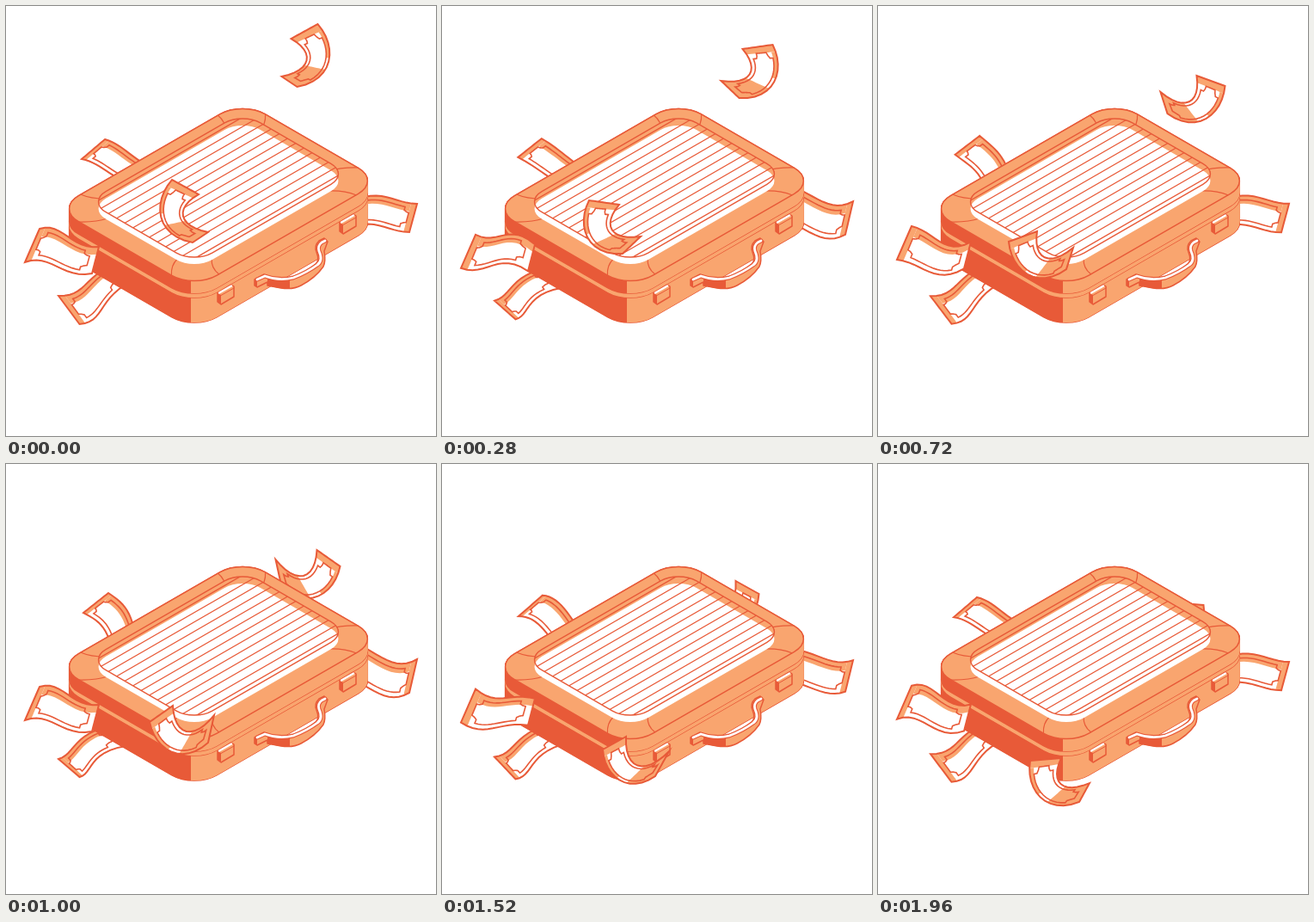
These frames come from a looping animation (500 by 500 pixels, 2 s). An HTML page with a canvas:

```html
<!DOCTYPE html>
<html>
<head>
<meta charset="utf-8">
<style>
html, body { margin: 0; width: 100%; height: 100%; overflow: hidden; background: #fff; }
canvas { display: block; }
</style>
</head>
<body>
<canvas id="stage" width="500" height="500"></canvas>
<script>
const DARK = '#e85a38', LIGHT = '#f9a56f', WHITE = '#fff';
const LOOP = 2000, STEP = 40;
const g = document.getElementById('stage').getContext('2d');
const caseArt = new OffscreenCanvas(500, 500);

const lerp = (a, b, k) => a + (b - a) * k;
const mix = (a, b, k) => [lerp(a[0], b[0], k), lerp(a[1], b[1], k)];
const add = (a, b) => [a[0] + b[0], a[1] + b[1]];

function paint(c, path, fill, stroke, width = 1.5) {
  if (fill) { c.fillStyle = fill; c.fill(path); }
  if (stroke) { c.strokeStyle = stroke; c.lineWidth = width; c.stroke(path); }
}

// ---- Suitcase, in isometric coordinates around the middle of the lid ----
const isoPoint = (u, v, dy = 0) => [247 + .866 * (u + v), 219.5 + dy + .5 * (v - u)];

function isoRect(dy, w, h, r) {
  const flat = new Path2D(), path = new Path2D();
  flat.roundRect(-w / 2, -h / 2, w, h, r);
  path.addPath(flat, new DOMMatrix([.866, -.5, .866, .5, 247, 219.5 + dy]));
  return path;
}

function drawCase(c) {
  c.lineJoin = c.lineCap = 'round';
  const slab = dy => isoRect(dy, 250.2, 185.3, 30);
  const sides = c.createLinearGradient(0, 0, 500, 0);
  [[0, DARK], [.43, DARK], [.43, LIGHT], [1, LIGHT]].forEach(s => sides.addColorStop(...s));
  const extrude = (from, to, fill) => {
    for (let y = from; y > to; y -= .5) paint(c, slab(y), fill);
  };
  for (let y = 48.5; y >= 0; y -= .5) paint(c, slab(y), null, DARK);
  extrude(48.5, 19.5, sides);
  paint(c, slab(19.5), null, DARK);
  extrude(19.5, 14.5, LIGHT);
  paint(c, slab(14.5), null, DARK);
  extrude(14.5, 0, sides);
  paint(c, slab(0), LIGHT, DARK);

  // Seams of the four corner pieces
  const seams = new Path2D();
  for (const i of [-1, 1]) for (const j of [-1, 1]) {
    seams.moveTo(...isoPoint(i * 79, j * 70));
    seams.quadraticCurveTo(...isoPoint(i * 90, j * 80), ...isoPoint(i * 92, j * 92.6));
    seams.moveTo(...isoPoint(i * 102, j * 47));
    seams.quadraticCurveTo(...isoPoint(i * 114, j * 50), ...isoPoint(i * 125, j * 62));
  }
  paint(c, seams, null, DARK, 1.2);

  // Striped panel
  const top = isoRect(-8, 207.5, 142.7, 24), base = isoRect(0, 207.5, 142.7, 24);
  paint(c, top, LIGHT);
  paint(c, base, WHITE);
  c.save();
  c.clip(top);
  const stripes = new Path2D();
  for (let v = -66; v < 71; v += 11) {
    stripes.moveTo(...isoPoint(-104, v, -8));
    stripes.lineTo(...isoPoint(104, v, -8));
  }
  paint(c, stripes, null, DARK, 1.4);
  c.restore();
  paint(c, top, null, DARK, 1.4);

  // Latches
  for (const [x, y] of [[0, 0], [142, -82]]) {
    c.save();
    c.translate(x, y);
    paint(c, new Path2D('M246 334L262 324L265 326V338L250 347L246 344Z'), LIGHT, DARK);
    paint(c, new Path2D('M246 334L250 336V347L246 344Z'), DARK);
    paint(c, new Path2D('M248 333.5L262 325.5'), null, WHITE, 2.4);
    paint(c, new Path2D('M250 336.5L265 328'), null, DARK, 1);
    c.restore();
  }

  // Handle
  paint(c, new Path2D('M289 318L300 312Q316 319 333 315Q348 310 360 300Q365 296 361 286' +
    'Q358 279 364 273L370 270L374 274L370 285Q372 297 369 303Q360 316 343 325' +
    'Q334 330 320 328L304 325V321L292 327L289 325Z'), LIGHT, DARK);
  paint(c, new Path2D('M304 315Q318 320 330 318V329Q318 329 304 325Z'), DARK);
  paint(c, new Path2D('M289 318L292 320V327L289 325Z'), DARK);
  const grip = new Path2D('M292 318L301 314Q317 320 334 316Q350 310 362 301Q369 296 364 285Q362 279 367 275L371 273');
  paint(c, grip, null, DARK, 5);
  paint(c, grip, null, WHITE, 2.8);
}

// ---- Banknotes: a strip between two cubic edges, addressed by (s along, t across) ----
function bezier(p, s) {
  const r = s, q = 1 - s, w = [q * q * q, 3 * q * q * r, 3 * q * r * r, r * r * r];
  return [0, 1].map(k => w.reduce((sum, f, i) => sum + f * p[i][k], 0));
}

function trace(edges, corners) {
  const path = new Path2D();
  corners.forEach((a, i) => {
    const b = corners[(i + 1) % corners.length];
    for (let k = 0; k < 12; k++) {
      const [s, t] = mix(a, b, k / 12);
      path.lineTo(...mix(bezier(edges[0], s), bezier(edges[1], s), t));
    }
  });
  path.closePath();
  return path;
}

const box = (s0, t0, s1, t1) => [[s0, t0], [s1, t0], [s1, t1], [s0, t1]];
const notch = [[.09, .33], [.13, .31], [.17, .26], [.17, .15]];
const flipS = ([s, t]) => [1 - s, t], flipT = ([s, t]) => [s, 1 - t];
const half = [...notch, ...notch.map(flipS).reverse()];
const FRAME = [...half, ...half.map(flipT).reverse()];

function drawNote(edges, shades) {
  const outline = trace(edges, box(0, 0, 1, 1));
  paint(g, outline, WHITE);
  for (const b of shades) paint(g, trace(edges, box(...b)), LIGHT);
  paint(g, trace(edges, FRAME), null, DARK, 1.6);
  paint(g, outline, null, DARK, 2);
}

// Fluttering notes. Each vector: x, y, then cosine y, sine y and cosine x swings.
const flutters = {
  right: { turns: 3, edge: [[478, 228.5, 1.5], [452, 236, -6], [436, 216, -6], [400, 216, 12]],
    ends: [[-9, 36, -3], [-9, 36, -3]] },
  lower: { turns: 3, edge: [[61, 340, -3], [86, 338, 0, 0, 6], [84, 314, 2, 0, 6], [125, 302, -2]],
    ends: [[24.5, 27, 6], [14, 24]] },
  upper: { turns: 1, edge: [[117, 152.5, 2.5, 0, -2], [134, 160, 0, 6], [145, 172, 4, 2], [158, 192, -6, 0, 8]],
    ends: [[-28, 23, 0, -1.5, 1], [-27, 18]] },
  front: { turns: 2, edge: [[39, 260.6, -1.6, 5], [65, 267.3, -17, 9], [77, 273.3, 11, -21], [108, 276.5, 3.5, 1.5]],
    ends: [[-17, 39], [-8, 31]] }
};

function drawFlutter({ turns, edge, ends }, time) {
  const a = time / LOOP * turns * 2 * Math.PI, cos = Math.cos(a), sin = Math.sin(a);
  const swing = ([x, y, cy = 0, sy = 0, cx = 0]) => [x + cx * cos, y + cy * cos + sy * sin];
  const near = edge.map(swing), [e0, e1] = ends.map(swing);
  const far = near.map((p, i) => add(p, mix(e0, e1, i / 3)));
  drawNote([near, far], [[0, 0, .09, 1], [.09, 0, 1, .28]]);
}

// Falling notes: outer and inner corner of the top end, then of the curled end
const times = [0, 280, 720, 1000, 1240, 1520, 1960];
const poses = [
  [193, 202, 224, 219, 217, 275, 235, 263],
  [171, 226, 206, 231, 210, 288, 231, 268],
  [152, 274, 185, 262, 219, 306, 227, 281],
  [167, 300, 194, 281, 235, 324, 242, 292],
  [184, 321, 209, 297, 253, 336, 256, 302],
  [187, 332, 214, 317, 248, 363, 264, 334],
  [177, 345, 213, 342, 234, 393, 246, 371]
];

function poseAt(time) {
  const last = times.length - 1;
  time = Math.min(time, times[last]);
  let i = 0;
  while (i < last - 1 && time >= times[i + 1]) i++;
  const span = times[i + 1] - times[i], k = (time - times[i]) / span;
  const slope = (j, n) => {
    const a = Math.max(j - 1, 0), b = Math.min(j + 1, last);
    return (poses[b][n] - poses[a][n]) / (times[b] - times[a]) * span;
  };
  return poses[i].map((v, n) => {
    const w = k * k * (3 - 2 * k);
    return lerp(v, poses[i + 1][n], w) +
      k * (1 - k) * ((1 - k) * slope(i, n) - k * slope(i + 1, n));
  });
}

// Curve from a to b; each bulge is a fraction along and a fraction sideways
function curl(a, b, bulges) {
  const dx = b[0] - a[0], dy = b[1] - a[1];
  const mid = bulges.map(([f, n]) => [a[0] + f * dx - n * dy, a[1] + f * dy + n * dx]);
  return [a, ...mid, b];
}

function drawFalling(time) {
  const p = poseAt(time);
  const outer = curl(p.slice(0, 2), p.slice(4, 6), [[.23, .39], [.73, .5]]);
  const inner = curl(p.slice(2, 4), p.slice(6, 8), [[.19, .68], [.66, .71]]);
  drawNote([outer, inner], [[0, 0, .09, 1], [.09, 0, .45, .15], [.62, 0, 1, 1]]);
}

function frame(now) {
  const time = Math.floor(now % LOOP / STEP) * STEP;
  g.fillStyle = WHITE;
  g.fillRect(0, 0, 500, 500);
  g.save();
  g.translate(555.5, -181);
  g.scale(-1, 1);
  drawFalling(time);
  g.restore();
  for (const name of ['right', 'lower', 'upper']) drawFlutter(flutters[name], time);
  g.drawImage(caseArt, 0, 0);
  drawFlutter(flutters.front, time);
  drawFalling(time);
}

drawCase(caseArt.getContext('2d'));
const start = performance.now();
function tick() {
  frame(performance.now() - start);
  requestAnimationFrame(tick);
}
tick();
</script>
</body>
</html>
```
